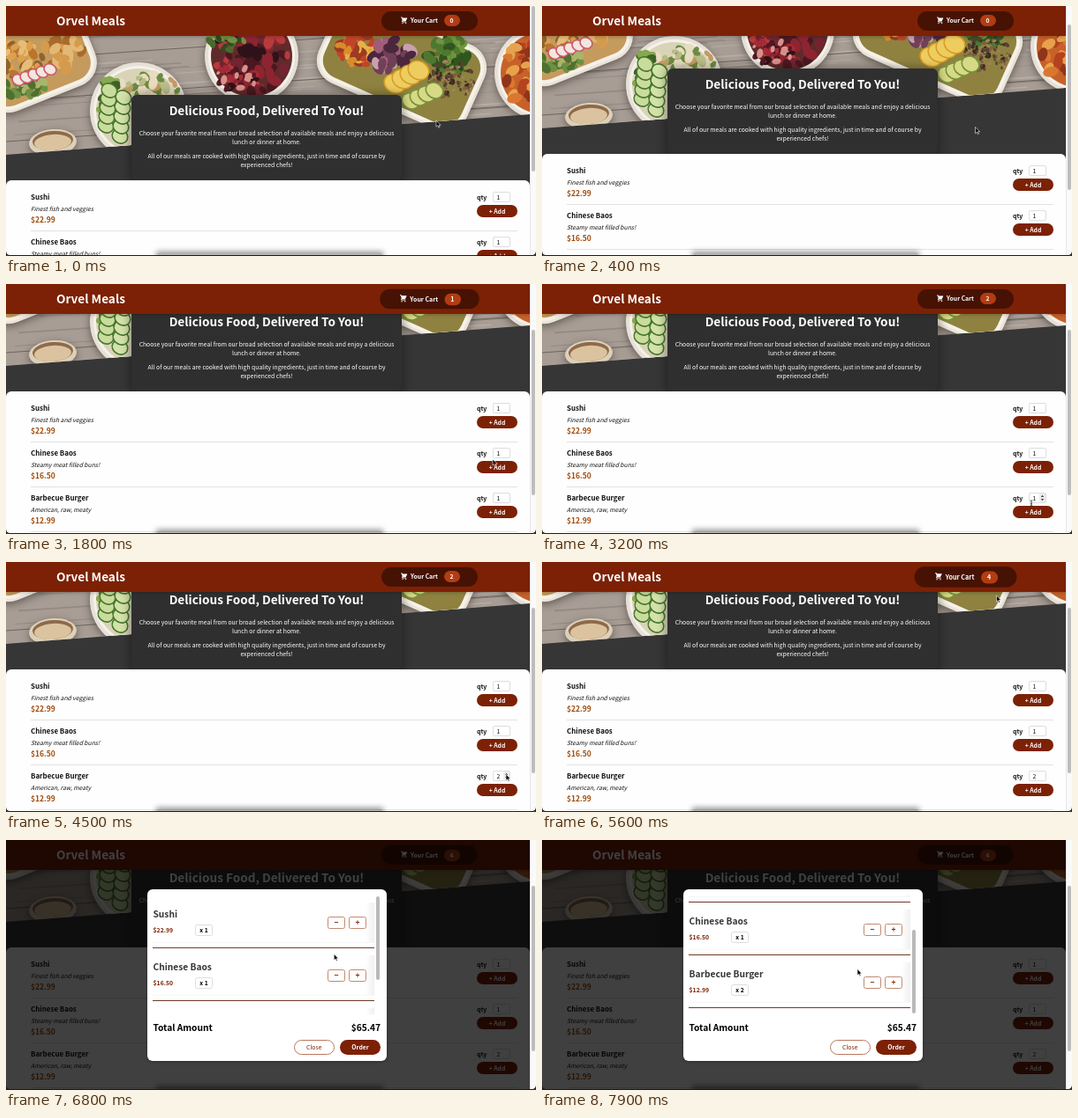
These frames come from a looping animation (600 by 284 pixels, 8 s). An HTML page with a canvas:

```html
<!DOCTYPE html>
<html lang="en">
<head>
<meta charset="utf-8">
<title>Meal ordering</title>
<style>
  html, body { margin: 0; width: 100%; height: 100%; overflow: hidden; }
  body { background: #363636; font-family: "Noto Sans CJK JP", "Noto Sans CJK SC", "Noto Sans CJK", "Noto Sans", sans-serif; }
  #stage { position: relative; width: 600px; height: 284px; overflow: hidden; background: #363636; }
  #stage div, #stage canvas, #stage svg { position: absolute; box-sizing: border-box; }
  .text { height: 20px; line-height: 20px; white-space: pre; }
  .bold { font-weight: 700; }
  .mid { text-align: center; }
  #page { left: 0; top: 0; width: 593px; height: 520px; }
  #intro { left: 142px; top: 101px; width: 306px; height: 97px; border-radius: 6px; background: #2f2f2f; color: #fff; box-shadow: 0 1px 8px 4px rgba(0,0,0,.25); }
  #list { left: 0; top: 198px; width: 593px; height: 320px; border-radius: 6px; background: #fdfefd; }
  .rule { left: 28px; width: 551px; height: 1px; background: #e2e2e2; }
  .pill { border-radius: 20px; background: #7c2105; color: #fff; }
  .input { border: 1px solid #dedede; border-radius: 2px; background: #fff; }
  #header { left: 0; top: 0; width: 593px; height: 34px; background: #7c2105; color: #fff; box-shadow: 0 1px 4px rgba(0,0,0,.25); }
  #cart { left: 425px; top: 5.5px; width: 108.5px; height: 22px; border-radius: 11px; background: #461203; }
  #badge { left: 70.5px; top: 4.5px; width: 18px; height: 13px; background: #b33c12; }
  #shade { left: 0; top: 0; width: 593px; height: 284px; background: rgba(0,0,0,.75); }
  #modal { left: 160px; top: 56px; width: 271px; height: 195px; border-radius: 6px; background: #fff; box-shadow: 0 1px 4px rgba(0,0,0,.25); }
  #clip { left: 6px; top: 7px; width: 252px; height: 135px; overflow: hidden; }
  #items { left: 0; top: 0; width: 251px; height: 190px; }
  .item { left: 0; width: 251px; height: 60px; border-bottom: 1px solid #6d3a2b; }
  .tint { left: 0; top: 8px; width: 251px; height: 46px; background: linear-gradient(90deg, transparent 96%, #f0f0f0); border-bottom: 1px solid #f6f6f6; }
  .box { border: 1px solid #ddd; border-radius: 2.5px; }
  .step { border: 1px solid #c08a72; border-radius: 2.5px; }
  #thumb2 { left: 259px; top: 8px; width: 3.5px; height: 95px; border-radius: 2px; background: #b9b9b9; }
  #bar { left: 593px; top: 0; width: 7px; height: 284px; background: #fafafa; border-left: 1px solid #e6e6e6; }
  #thumb { left: 1px; top: 0; width: 4px; height: 188px; border-radius: 2px; background: #bdbdbd; }
  #dock { left: 172px; top: 281px; width: 253px; height: 10px; background: rgba(0,0,0,.3); box-shadow: 0 0 6px 2px rgba(0,0,0,.42); }
  #edge { left: -2px; top: -8px; width: 604px; height: 292px; border: solid #1c1c1c; border-width: 0 2px 1px; border-radius: 0 0 6px 6px; box-shadow: 0 0 0 4px #1c1c1c; }
  #pointer { left: 0; top: 0; overflow: visible; }
</style>
</head>
<body>
<div id="stage"></div>
<script>
const LOOP = 8000, STEP = 100;
const stage = document.getElementById('stage');

function add(parent, props = {}, style = {}) {
  const el = document.createElement(props.tag || 'div');
  if (props.id) el.id = props.id;
  if (props.cls) el.className = props.cls;
  for (const k in style) el.style[k] = typeof style[k] === 'number' ? style[k] + 'px' : style[k];
  parent.append(el);
  return el;
}

// Text whose capitals are centred on cy.
function text(parent, str, x, cy, size, cls = '', style = {}) {
  const el = add(parent, { cls: 'text ' + cls },
    { left: x, top: cy - 10 - size * 0.07, fontSize: size, ...style });
  el.textContent = str;
  return el;
}

function box(parent, cls, left, top, width, height, style = {}) {
  return add(parent, { cls }, { left, top, width, height, ...style });
}

function label(parent, str, size, cls = 'bold', style = {}) {
  return text(parent, str, 0, 0, size, 'mid ' + cls,
    { left: 0, width: '100%', top: `calc(50% - ${10 + size * 0.07}px)`, ...style });
}

function svg(parent, id, markup, style = {}) {
  const el = document.createElementNS('http://www.w3.org/2000/svg', 'svg');
  el.id = id;
  el.innerHTML = markup;
  for (const k in style) el.style[k] = style[k];
  parent.append(el);
  return el;
}

const meals = [
  ['Sushi', 'Finest fish and veggies', '$22.99', 1],
  ['Chinese Baos', 'Steamy meat filled buns!', '$16.50', 1],
  ['Barbecue Burger', 'American, raw, meaty', '$12.99', 2],
];

// Page
const page = add(stage, { id: 'page' });
const photo = add(page, { tag: 'canvas' }, { left: 0, top: 0 });
const intro = add(page, { id: 'intro' });
const introText = (str, y, size, cls = '') =>
  text(intro, str, 0, y, size, 'mid ' + cls, { width: '306px' });
introText('Delicious Food, Delivered To You!', 18, 13.6, 'bold');
introText('Choose your favorite meal from our broad selection of available meals and enjoy a delicious', 43.5, 6.8);
introText('lunch or dinner at home.', 53, 6.8);
introText('All of our meals are cooked with high quality ingredients, just in time and of course by', 69.5, 6.8);
introText('experienced chefs!', 79, 6.8);

const list = add(page, { id: 'list' });
const inputs = meals.map(([name, about, price], i) => {
  const y = i * 51;
  text(list, name, 28, y + 19.5, 7.96, 'bold', { color: '#111' });
  text(list, about, 28, y + 32, 6.8, '', { fontStyle: 'italic', color: '#111' });
  text(list, price, 28, y + 45, 8.5, 'bold', { color: '#a14a0b' });
  text(list, 'qty', 533, y + 19.5, 6.9, 'bold', { color: '#111' });
  const input = box(list, 'input', 551, y + 13, 20, 12);
  const value = text(input, '1', 3.5, 5.3, 6.8, '', { color: '#111' });
  label(box(list, 'pill', 533, y + 28, 46, 14), '+ Add', 6.8);
  box(list, 'rule', 28, y + 57, 551, 1);
  return { input, value };
});
const spinner = svg(inputs[2].input, 'spinner',
  '<rect width="7" height="10" rx="1" fill="#ececec"/><path d="M1.8 4L3.5 1.8 5.2 4ZM1.8 6L3.5 8.2 5.2 6Z" fill="#444"/>',
  { left: '11px', top: '0', width: '7px', height: '10px' });

// Header
const header = add(stage, { id: 'header' });
text(header, 'Orvel Meals', 57, 17, 13.6, 'bold');
const cart = add(header, { id: 'cart' });
svg(cart, 'icon', '<path fill="#fff" transform="scale(.46)" d="M3 1a1 1 0 000 2h1.22l1.67 6.7-.9.89C3.74 11.85 4.63 14 6.41 14H15a1 1 0 000-2H6.41l1-1H14a1 1 0 00.9-.55l3-6A1 1 0 0017 3H6.28l-.31-1.24A1 1 0 005 1H3zM16 16.5a1.5 1.5 0 11-3 0 1.5 1.5 0 013 0zM6.5 18a1.5 1.5 0 100-3 1.5 1.5 0 000 3z"/>',
  { left: '20.5px', top: '6px', width: '10px', height: '10px' });
text(cart, 'Your Cart', 33, 11.3, 6.8, 'bold');
const count = label(add(cart, { id: 'badge', cls: 'pill' }), '0', 6.8);

// Cart window
const shade = add(stage, { id: 'shade' });
const modal = add(stage, { id: 'modal' });
const items = add(add(modal, { id: 'clip' }), { id: 'items' });
meals.forEach(([name, , price, qty], i) => {
  const item = add(items, { cls: 'item' }, { top: i * 60 });
  add(item, { cls: 'tint' });
  text(item, name, 0.5, 21.5, 10.2, 'bold', { color: '#363636' });
  text(item, price, 0.5, 39.5, 6.9, 'bold', { color: '#7c2105' });
  label(box(item, 'box', 48, 33, 20, 13), 'x ' + qty, 6.8);
  ['−', '+'].forEach((sign, k) =>
    label(box(item, 'step', 198 + k * 24, 23.5, 20, 14), sign, 8.5, 'bold', { color: '#7c2105' }));
});
const thumb2 = add(modal, { id: 'thumb2' });
text(modal, 'Total Amount', 6.5, 157.5, 10.2, 'bold');
text(modal, '$65.47', 0, 157.5, 10.2, 'bold', { left: 'auto', right: '7px' });
label(box(modal, 'pill', 166, 171, 45.5, 17, { background: '#fff', border: '1px solid #b9795f' }),
  'Close', 6.8, '', { color: '#7c2105' });
label(box(modal, 'pill', 218, 171, 46, 17), 'Order', 6.8);

// Window frame
const thumb = add(add(stage, { id: 'bar' }), { id: 'thumb' });
add(stage, { id: 'dock' });
add(stage, { id: 'edge' });
const pointer = svg(stage, 'pointer',
  '<path id="arrow" d="M0 0V7.2L1.7 5.7 2.8 8.2 4 7.7 2.9 5.3H5.1Z" fill="#000" stroke="#fff" stroke-width=".6"/>' +
  '<path id="beam" d="M-1.3 -3.2Q0 -3.2 0 -2.4V2.4Q0 3.2 -1.3 3.2M1.3 -3.2Q0 -3.2 0 -2.4M0 2.4Q0 3.2 1.3 3.2M-.9 .8H.9" fill="none" stroke="#222" stroke-width=".8"/>',
  { width: '6px', height: '9px' });
const [arrow, beam] = pointer.children;

// Banner picture: a wooden table with bowls of food
function paintTable() {
  const c = photo.getContext('2d');
  photo.width = 593;
  photo.height = 172;
  let seed = 11;
  const rnd = () => (seed = (seed * 16807) % 2147483647) / 2147483647;
  const pick = a => a[Math.floor(rnd() * a.length)];
  const oval = (x, y, rx, ry, fill, rot = 0) => {
    c.fillStyle = fill;
    c.beginPath();
    c.ellipse(x, y, rx, ry, rot, 0, 7);
    c.fill();
  };
  const at = (x, y, rot, draw) => {
    c.save();
    c.translate(x, y);
    c.rotate(rot);
    draw();
    c.restore();
  };
  const shadow = (on) => {
    c.shadowColor = on ? 'rgba(40,30,25,.5)' : 'transparent';
    c.shadowBlur = 9;
    c.shadowOffsetY = 3;
  };
  const bowl = (x, y, r, inner) => {
    shadow(true);
    oval(x, y, r, r, '#e6e1d8');
    shadow(false);
    oval(x, y, r - 4, r - 4, '#f5f1e9');
    oval(x, y, r - 7, r - 7, inner);
  };
  const tray = (x, y, w, h, rot, inner) => at(x, y, rot, () => {
    const shape = (d, fill) => {
      c.fillStyle = fill;
      c.beginPath();
      c.roundRect(-w / 2 + d, -h / 2 + d, w - 2 * d, h - 2 * d, 28 - d);
      c.fill();
    };
    shadow(true);
    shape(0, '#e9e3d8');
    shadow(false);
    shape(3, '#f6f1e8');
    shape(7, inner);
  });
  const scatter = (x, y, rx, ry, n, size, colors) => {
    for (let i = 0; i < n; i++) {
      const a = rnd() * 6.283, d = Math.sqrt(rnd()), s = size * (0.5 + rnd() * 0.6);
      oval(x + Math.cos(a) * d * rx, y + Math.sin(a) * d * ry, s, s * 0.65, pick(colors), rnd() * 3);
    }
  };
  const slices = (x, y, dx, dy, n, r, skin, flesh) => {
    for (let i = 0; i < n; i++) {
      oval(x + dx * i, y + dy * i, r, r * 0.85, skin, 0.5);
      oval(x + dx * i, y + dy * i, r - 1.6, r * 0.85 - 1.6, flesh, 0.5);
    }
  };

  c.beginPath();
  c.moveTo(0, 0);
  c.lineTo(593, 0);
  c.lineTo(593, 123);
  c.lineTo(0, 169);
  c.clip();
  c.fillStyle = '#a79d95';
  c.fillRect(0, 0, 593, 172);
  for (let i = 0; i < 130; i++) {
    const y = rnd() * 215, x = rnd() * 593;
    c.strokeStyle = pick(['rgba(205,198,190,.4)', 'rgba(105,94,86,.3)']);
    c.lineWidth = 0.5 + rnd() * 1.5;
    c.beginPath();
    c.moveTo(x, y - x * 0.07);
    c.lineTo(x + 90, y - x * 0.07 - 6);
    c.stroke();
  }
  c.strokeStyle = '#6f655e';
  c.lineWidth = 1;
  for (let y = 62; y < 200; y += 46) {
    c.beginPath();
    c.moveTo(0, y);
    c.lineTo(593, y - 42);
    c.stroke();
  }

  tray(32, 62, 134, 92, -0.38, '#c59a5d');
  scatter(14, 62, 28, 22, 60, 7, ['#dfa04c', '#b9752f', '#e5bd79', '#8d6430']);
  scatter(64, 52, 22, 17, 36, 9, ['#d59b4c', '#e3b875', '#a96b2d']);
  scatter(20, 92, 34, 10, 30, 7, ['#4e7031', '#6d9144', '#a8b56b']);
  slices(14, 84, 9, -3, 5, 8, '#cc596e', '#f3e6df');

  shadow(true);
  oval(53, 155, 27, 15, '#ddd0b9', -0.08);
  shadow(false);
  oval(53, 153, 23, 11, '#8d6a4a', -0.08);
  oval(53, 155, 21, 9, '#dcc3a0', -0.08);

  bowl(150, 119, 55, '#d9d3b8');
  scatter(160, 96, 34, 20, 60, 7, ['#e8dcc0', '#c29b62', '#b8bc88', '#6b8b42']);
  scatter(120, 110, 15, 28, 30, 7, ['#55772e', '#86a850', '#3f5f25']);
  slices(113, 136, 1, -10, 5, 10, '#47762f', '#c9dc9b');
  slices(129, 148, 1, -11, 5, 10, '#47762f', '#d3e2a9');

  bowl(278, 57, 53, '#612a2a');
  scatter(278, 58, 41, 40, 80, 9, ['#8e2430', '#4b1822', '#b93a3b', '#2f1219', '#742331']);
  scatter(262, 82, 26, 14, 22, 5, ['#d9908a', '#a52a35', '#531824']);
  scatter(250, 38, 20, 13, 26, 6, ['#476a2d', '#739044', '#2f4b20']);

  tray(448, 66, 184, 104, 0.42, '#8f8240');
  scatter(402, 50, 27, 17, 60, 7, ['#d98c2c', '#c34326', '#e6b04a', '#9c3a22']);
  scatter(438, 58, 22, 20, 36, 9, ['#704057', '#a05d78', '#4b273d', '#c9a0af']);
  scatter(502, 55, 25, 18, 60, 8, ['#31551f', '#4e7830', '#6e963c']);
  scatter(504, 84, 26, 22, 110, 3, ['#3c2d21', '#7f5f3c', '#574231', '#a1835a']);
  slices(440, 88, 9, -5, 4, 13, '#d99c24', '#edcd60');
  slices(458, 108, 9, -4, 4, 11, '#74933d', '#d7d985');

  bowl(606, 76, 53, '#c7612a');
  scatter(603, 76, 42, 41, 70, 8, ['#d97730', '#b4421f', '#e7a24c', '#8f351a']);
}
paintTable();

// Timeline
const scrollKeys = [[0, 0], [200, 7], [400, 30], [600, 57], [800, 71], [1000, 76]];
const itemKeys = [[7200, 0], [7400, 18], [7600, 42], [7800, 52]];
const pointerKeys = [
  [0, 487, 130], [400, 490.5, 137.5], [1000, 492, 141], [1450, 556, 157], [1600, 556, 157],
  [1800, 551, 199], [2050, 555, 207], [2700, 555, 207], [3200, 554, 249], [3600, 560, 246],
  [4000, 566, 241], [4500, 566, 241], [5000, 557, 259], [5400, 557, 259], [5600, 514.5, 38],
  [5900, 494, 13], [6200, 494, 13], [6300, 487, 22], [6900, 362, 138], [7200, 357, 146.5],
];
const clicks = [1560, 2620, 5390];
const bumpKeys = [[0, 1], [30, 0.9], [90, 1.1], [150, 1.15], [300, 1]];
const OPEN = 6130, QTY_UP = 4200;

const easeOut = x => 1 - Math.pow(1 - x, 1.7);
const linear = x => x;
const smooth = x => x * x * (3 - 2 * x);

function along(keys, t, ease = linear) {
  if (t <= keys[0][0]) return keys[0].slice(1);
  const i = keys.findIndex(k => k[0] > t);
  if (i < 0) return keys[keys.length - 1].slice(1);
  const a = keys[i - 1], b = keys[i], f = ease((t - a[0]) / (b[0] - a[0]));
  return a.slice(1).map((v, k) => v + (b[k + 1] - v) * f);
}

function render(t) {
  const [scroll] = along(scrollKeys, t);
  page.style.top = -scroll + 'px';
  thumb.style.top = scroll * 0.69 + 'px';

  const done = clicks.filter(c => t >= c);
  count.textContent = done.length === 3 ? 4 : done.length;
  const [scale] = done.length ? along(bumpKeys, t - done[done.length - 1], easeOut) : [1];
  cart.style.transform = `scale(${scale})`;

  inputs[2].value.textContent = t < QTY_UP ? 1 : 2;
  spinner.style.display = t >= 3000 && t < 4800 ? '' : 'none';

  const open = t >= OPEN;
  const p = easeOut(Math.min(1, Math.max(0, (t - OPEN) / 300)));
  shade.style.display = modal.style.display = open ? '' : 'none';
  modal.style.opacity = p;
  modal.style.transform = `translateY(${-20.4 * (1 - p)}px)`;
  const [shift] = along(itemKeys, t);
  items.style.top = -shift + 'px';
  thumb2.style.top = 8 + shift * 0.74 + 'px';

  const [x, y] = along(pointerKeys, t, smooth);
  pointer.style.transform = `translate(${x}px, ${y}px)`;
  const typing = t >= 3000 && t < 3800;
  arrow.style.display = typing ? 'none' : '';
  beam.style.display = typing ? '' : 'none';
}

function tick() {
  render(Math.floor((performance.now() % LOOP) / STEP) * STEP);
  requestAnimationFrame(tick);
}
tick();
</script>
</body>
</html>
```
